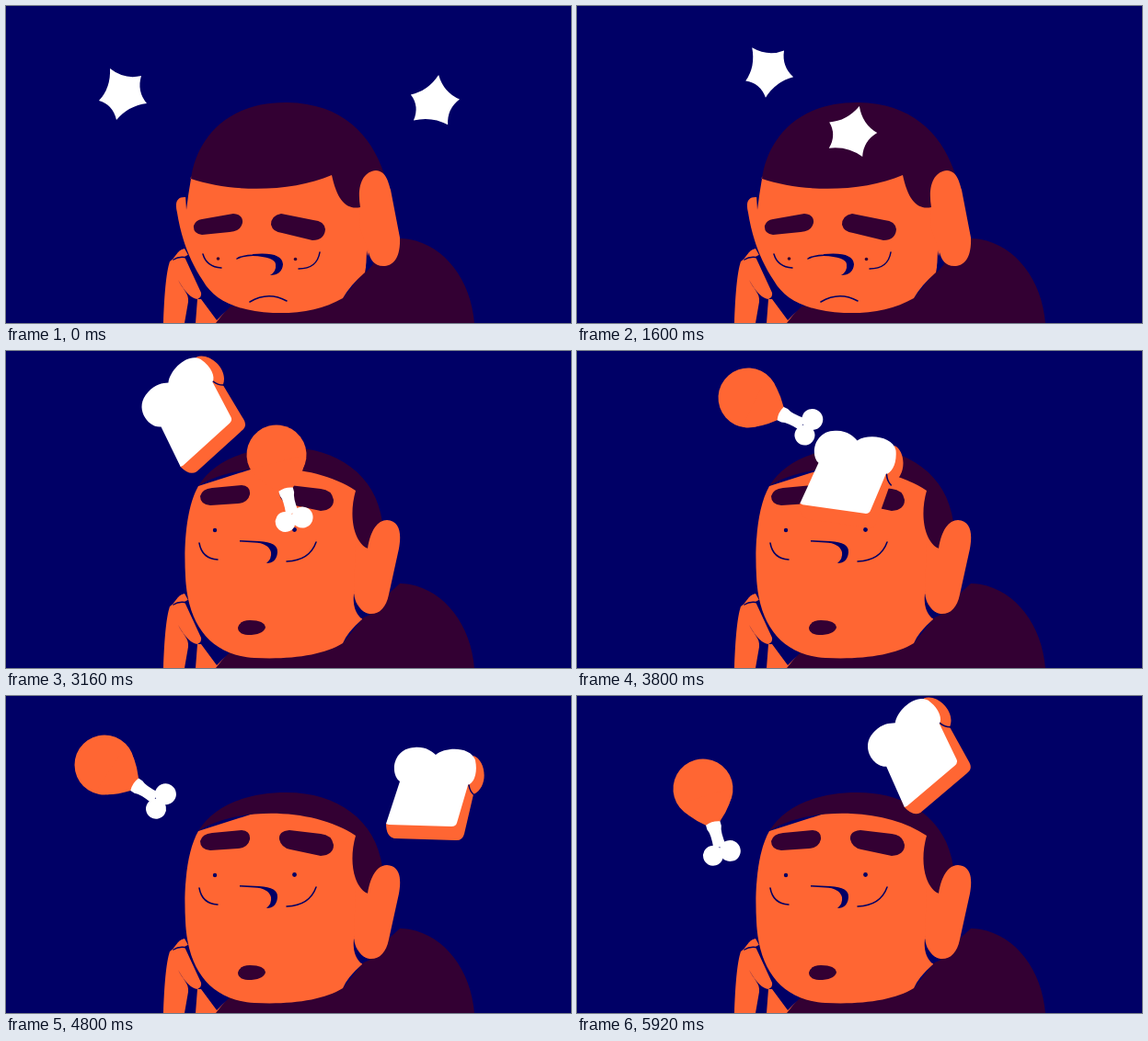
These frames come from a looping animation (614 by 345 pixels, 5.96 s). An HTML page:

```html
<!DOCTYPE html>
<html lang="en">
<head>
<meta charset="utf-8">
<title>Dizzy, then hungry</title>
<style>
  html, body { margin: 0; width: 100%; height: 100%; overflow: hidden; background: #006; }
  svg { display: block; width: 100vw; height: 100vh; }
  .skin { fill: #f63; }
  .dark { fill: #303; }
  .navy { fill: #006; }
  .white { fill: #fff; }
  .line { fill: none; stroke: #006; stroke-width: 1.5; stroke-linecap: round; }
</style>
</head>
<body>
<svg viewBox="0 0 614 345">
  <path class="dark" d="M225 345L243 327L366 318L390 288L428 253C472 254 505 295 509 345Z"/>

  <g id="hand">
    <path class="skin" d="M171 345C172 315 174 290 178 278C184 275 185 266 194 264L214 300L240 330L228 345Z"/>
    <path class="navy" d="M187 298C192 309 199 312 198 322L194 345L206 345L208 319Q198 318 187 298Z"/>
    <path class="navy" d="M194 273L212 312Q213 317 208 319L212 319L229 342L244 327L216 300L199 270Z"/>
    <path class="line" d="M182 276Q188 272 197 274" stroke-width="2"/>
  </g>

  <g id="sad">
    <path class="skin" d="M201 186L196 208C186 207 183 213 186 225C190 250 198 275 214 299C226 320 250 332 290 334C320 335 345 330 366 318Q374 304 390 290L394 268L386 180L300 150Z"/>
    <path class="dark" d="M201 188C206 150 235 104 306 105C365 106 397 140 411 183L400 215L385 219C370 222 360 212 354 184C310 203 245 203 201 188Z"/>
    <path class="navy" d="M194 190L201 188Q198 205 196 222Z"/>
    <path class="skin" d="M385 219C381 195 388 180 402 179C413 180 415 190 418 200L428 252C429 275 420 283 410 283C400 283 396 276 394 268L384 240Z"/>
    <path class="navy" d="M392 266Q393 277 399 281L391 290Z"/>
    <path class="dark" d="M213 232L247 226Q258 227 257 236Q255 245 243 246L213 249Q203 248 204 239Q206 233 213 232Z"/>
    <path class="dark" d="M299 226Q288 228 288 238Q290 246 300 247L333 255Q346 255 347 243Q346 234 334 233Z"/>
    <circle class="dark" cx="230.500" cy="275" r="1.800"/>
    <circle class="dark" cx="314.500" cy="275.500" r="1.800"/>
    <path class="line" d="M214 270Q218 284 234 285M341 268Q338 286 318 286M251 275Q257 271 275 271M265 322Q285 310 305 321"/>
    <path class="navy" d="M268 270Q300 267 301 281Q300 293 287 293Q294 289 293 281Q292 273 268 272Z"/>
  </g>

  <g id="happy">
    <path class="skin" d="M209 147C196 170 193 210 195 245C197 295 220 331 270 334C310 336 345 331 366 318Q371 306 387 292L378 264L393 215L385 145L300 118Z"/>
    <path class="dark" d="M209 147C225 120 260 105 305 105C360 105 402 135 409 186L393 215C378 208 372 180 380 152C335 121 250 120 209 147Z"/>
    <path class="skin" d="M393 215C396 195 404 184 414 184C428 185 430 198 427 215L416 265C413 280 405 287 395 286C386 285 380 275 378 264L380 210Z"/>
    <path class="navy" d="M378 264Q381 284 396 287L386 291Q376 282 378 264Z"/>
    <path class="dark" d="M224 149L256 146Q266 147 265 156Q263 165 252 166L222 168Q211 167 211 158Q213 150 224 149Z"/>
    <path class="dark" d="M308 146Q296 147 297 156Q299 165 309 167L342 174Q356 173 356 162Q354 151 342 150Z"/>
    <circle class="navy" cx="227" cy="195" r="2.200"/>
    <circle class="navy" cx="313.500" cy="194.500" r="2.400"/>
    <path class="line" d="M210 209Q213 226 230 227M337 208Q330 228 305 229"/>
    <path class="navy" d="M254 206L275 207Q296 208 295 219Q294 231 283 231Q289 226 288 219Q285 209 270 208.500L254 207.500Z"/>
    <path class="dark" d="M265 293Q281 293 282 301Q279 309 263 309Q252 308 252 301Q254 293 265 293Z"/>
  </g>

  <g id="starA"></g>
  <g id="starB"></g>

  <g id="drum">
    <g class="white">
      <path d="M34 -8L44 -8Q50 -5 66 -7L66 7Q50 5 44 8L34 8Z"/>
      <circle cx="73" cy="-9.500" r="11.500"/>
      <circle cx="73" cy="9.500" r="11"/>
    </g>
    <circle class="skin" r="32.500"/>
    <path class="skin" d="M8 -31Q24 -26 39 -8Q36 0 39 8Q24 26 8 31Z"/>
  </g>

  <g id="bread">
    <g transform="translate(-450 -140)">
      <path class="skin" d="M508 65C522 70 525 99 508 107L498 150Q496 158 488 157L422 155Q413 153 413 139L480 100Z"/>
      <path class="white" d="M413 139L428 93C417 85 420 57 444 56C456 55 462 60 467 64C478 55 505 55 510 70C513 85 508 95 502 97L490 138Q489 142 484 142L416 140Z"/>
      <path class="line" d="M503 97Q504 104 509 108"/>
    </g>
  </g>
</svg>

<script>
const LOOP = 5960, STEP = 40, ORBIT = 1280, FOOD_START = 1840;
const $ = id => document.getElementById(id);

// Orbit keys: time, x, y, angle
const starKeys = [
  [0, 128, 94, -2], [280, 208, 71, -8], [480, 373, 67, -8], [600, 465, 106, 36],
  [640, 467, 109, 38], [920, 298, 139, 43], [1120, 140, 127, 43], [1240, 127, 96, 0]
];
const drumKeys = [
  [0, 107, 75, 33], [280, 186, 51, 26], [480, 351, 52, 26], [600, 459, 80, 62],
  [640, 461, 83, 68], [920, 294, 113, 75], [1120, 137, 101, 74], [1240, 106, 79, 36]
];
const breadKeys = [
  [0, 450, 140, 0], [280, 279, 171, 6.5], [480, 122, 159, 6], [600, 135, 126, -35],
  [640, 138, 124, -38], [920, 217, 101, -44], [1120, 384, 97, -42], [1240, 449, 137, -3]
];

// Smooth periodic curve through the keys; angles never overshoot
function sample(keys, time, dim) {
  const n = keys.length;
  const key = i => {
    const turn = Math.floor(i / n), k = keys[i - turn * n];
    return [k[0] + turn * ORBIT, k[dim]];
  };
  const slope = i => {
    const a = key(i), b = key(i + 1);
    return (b[1] - a[1]) / (b[0] - a[0]);
  };
  const tangent = i => {
    const before = key(i)[0] - key(i - 1)[0], after = key(i + 1)[0] - key(i)[0];
    const s = slope(i - 1), e = slope(i);
    if (dim === 3) {
      return s * e <= 0 ? 0 : Math.sign(s) * Math.min(Math.abs(s), Math.abs(e));
    }
    return (s * after + e * before) / (before + after);
  };
  let i = n - 1;
  while (keys[i][0] > time) i--;
  const [t0, v0] = key(i), [t1, v1] = key(i + 1);
  const d = t1 - t0, u = (time - t0) / d, w = 1 - u;
  return v0 * w * w * (1 + 2 * u) + v1 * u * u * (3 - 2 * u)
    + d * u * w * (tangent(i) * w - tangent(i + 1) * u);
}

function place(id, keys, time) {
  const t = ((time % ORBIT) + ORBIT) % ORBIT;
  const [x, y, a] = [1, 2, 3].map(dim => sample(keys, t, dim));
  $(id).setAttribute('transform', `translate(${x} ${y}) rotate(${a})`);
}

function show(id, on) {
  $(id).style.display = on ? '' : 'none';
}

const tips = [[-14, -28], [20, -20], [26, 10], [-7, 28], [-26, 7]];
const starPath = 'M' + tips[0] + tips.map((p, i) => {
  const q = tips[(i + 1) % tips.length];
  return `Q${(p[0] + q[0]) * 0.325} ${(p[1] + q[1]) * 0.325} ${q}`;
}).join('') + 'Z';
for (const id of ['starA', 'starB']) {
  $(id).innerHTML = `<path class="white" d="${starPath}"/>`;
}

const start = performance.now();
function draw() {
  const elapsed = Math.max(0, performance.now() - start) % LOOP;
  const t = Math.floor(elapsed / STEP) * STEP;
  const hungry = t >= FOOD_START;
  for (const id of ['happy', 'drum', 'bread']) show(id, hungry);
  for (const id of ['sad', 'starA', 'starB']) show(id, !hungry);
  if (hungry) {
    place('drum', drumKeys, t + 320);
    place('bread', breadKeys, t + 320);
  } else {
    place('starA', starKeys, t - 40);
    place('starB', starKeys, t + 600);
  }
  requestAnimationFrame(draw);
}
draw();
</script>
</body>
</html>
```
